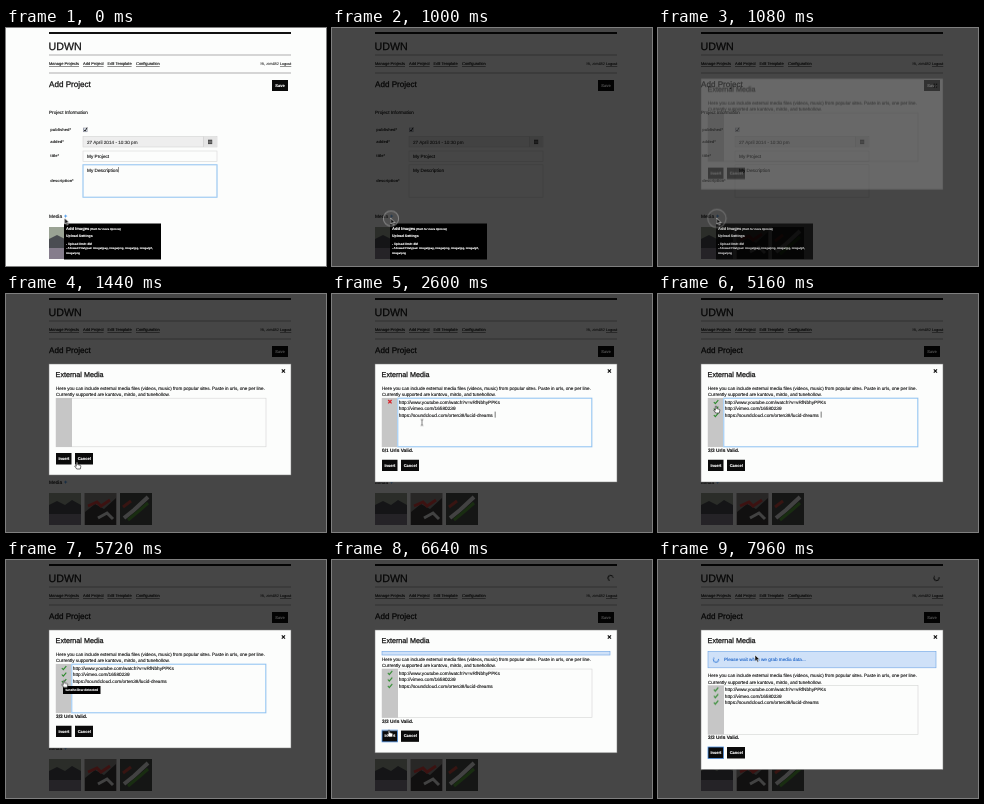
Animation, 320 px wide and 238 px high, one loop 8000 ms. Source, as an HTML page:

```html
<!DOCTYPE html>
<html lang="en">
<head>
<meta charset="utf-8">
<title>Add Project</title>
<style>
html, body { margin: 0; width: 100%; height: 100%; overflow: hidden; background: #fff; }
svg { display: block; width: 100vw; height: 100vh; }
text { font-family: "Liberation Sans", Arial, sans-serif; text-rendering: geometricPrecision; white-space: pre; }
</style>
</head>
<body>
<svg id="stage" viewBox="0 0 320 238"></svg>
<script>
const LOOP = 8000;
const PAPER = '#fcfdfc';
const stage = document.getElementById('stage');

function add(parent, tag, attrs = {}) {
  const el = document.createElementNS('http://www.w3.org/2000/svg', tag);
  for (const k in attrs) el.setAttribute(k, attrs[k]);
  return parent.appendChild(el);
}
const group = (p, x = 0, y = 0) => add(p, 'g', { transform: `translate(${x} ${y})` });
const path = (p, d, attrs) => add(p, 'path', { d, fill: 'none', ...attrs });
const rect = (p, x, y, width, height, fill, more) => add(p, 'rect', { x, y, width, height, fill, ...more });
const box = (p, x, y, w, h, fill, stroke, sw = 0.6) =>
  rect(p, x, y, w, h, fill, { stroke, 'stroke-width': sw });
// a hairline stroke gives the slightly heavier screen look
function label(p, x, y, str, size, more = {}) {
  const fill = more.fill || '#111';
  const el = add(p, 'text', { x, y, 'font-size': size, stroke: fill, 'stroke-width': 0.12, ...more, fill });
  el.textContent = str;
  return el;
}
const bold = { 'font-weight': 700 };
const white = { 'font-weight': 700, fill: '#fff' };
const link = { 'text-decoration': 'underline' };
const title = { 'stroke-width': 0.25 };

// rows: [ms, keyframe]; the last row is held to the end of the loop
function play(el, rows, easing = 'linear') {
  const frames = rows.map(([ms, f]) => ({ offset: ms / LOOP, easing, ...f }));
  frames.push({ ...frames[frames.length - 1], offset: 1 });
  el.animate(frames, { duration: LOOP, iterations: Infinity });
}
// visible from the 1st time to the 2nd, the 3rd to the 4th, ...
function show(el, ...times) {
  const rows = times.map((ms, i) => [ms, { opacity: i % 2 ? 0 : 1 }]);
  if (times[0] > 0) rows.unshift([0, { opacity: 0 }]);
  play(el, rows, 'step-end');
}
const shift = (el, rows, easing) =>
  play(el, rows.map(([ms, x, y]) => [ms, { transform: `translate(${x}px, ${y}px)` }]), easing);
function button(p, x, y, w, h, str, tx) {
  rect(p, x, y, w, h, '#0a0a0a');
  label(p, tx, y + h / 2 + 1.4, str, 4, white);
}
function focusBox(p, x, y, w, h) {
  const g = group(p);
  box(g, x, y, w, h, 'none', '#e0effb', 1.6);
  box(g, x, y, w, h, 'none', '#86bdf0', 0.7);
  return g;
}
function spinner(p, x, y, r, color, width) {
  const g = group(group(p, x, y));
  add(g, 'circle', { r, fill: 'none', stroke: color, 'stroke-width': width,
    'stroke-dasharray': `${r * 4.2} ${r * 2.1}` });
  g.animate([{ transform: 'rotate(0deg)' }, { transform: 'rotate(360deg)' }],
    { duration: 800, iterations: Infinity });
}

// page
const page = group(stage);
rect(page, 0, 0, 320, 238, PAPER);
rect(page, 43, 4, 242, 2, '#111');
label(page, 42.6, 21.8, 'UDWN', 10.7, title);
rect(page, 43, 26.6, 242, 0.8, '#999');
rect(page, 43, 44.6, 242, 0.8, '#999');
[[43, 'Manage Projects'], [77, 'Add Project'], [101.5, 'Edit Template'], [130, 'Configuration']]
  .forEach(([x, s]) => label(page, x, 37.4, s, 4, link));
label(page, 254.5, 37.4, 'Hi, zim482', 3.9, { fill: '#444' });
label(page, 274, 37.4, 'Logout', 3.7, link);
label(page, 43, 59.4, 'Add Project', 8.1, title);
button(page, 266, 52, 16, 11, 'Save', 269.3);
label(page, 43, 85.6, 'Project Information', 4.65);
[[103.3, 'published*'], [115, 'added*'], [129.3, 'title*'], [154.1, 'description*']]
  .forEach(([y, s]) => label(page, 44.3, y, s, 4.05, { ...bold, 'stroke-width': 0 }));

box(page, 77.3, 100, 3.8, 3.8, '#dfe6ee', '#778', 0.5);
path(page, 'M78 101.8l1.1 1.3 2-3.5', { stroke: '#111', 'stroke-width': 0.9 });
box(page, 77, 108.5, 134, 10.5, '#eee', '#d4d4d4');
rect(page, 197.3, 108.9, 13.4, 9.8, '#e4e4e4');
rect(page, 197, 108.5, 0.6, 10.5, '#ccc');
rect(page, 202, 111.7, 4.2, 4.4, '#444');
path(page, 'M202.4 113.3h3.4M202.4 114.7h3.4', { stroke: '#ccc', 'stroke-width': 0.4 });
label(page, 81, 115.5, '27 April 2014 - 10:30 pm', 4.65, { fill: '#333' });
box(page, 77, 123, 134, 10.5, PAPER, '#d8d8d8');
label(page, 81, 129.6, 'My Project', 4.7);
box(page, 77, 136.8, 134, 32.4, PAPER, '#d8d8d8');
const focus = focusBox(page, 77, 136.8, 134, 32.4);
rect(focus, 112.2, 139, 0.5, 5.4, '#222');
label(page, 81, 143.5, 'My Description', 4.7);
play(focus, [[0, { opacity: 1 }], [40, { opacity: 0.8 }], [280, { opacity: 0 }]]);

label(page, 43, 189.8, 'Media', 4.8);
label(page, 58, 190, '+', 5.6, { ...bold, fill: '#3a8fe8' });

// thumbnails
const thumb = (x, fill) => rect(page, x, 199, 32, 32, fill);
thumb(43, '#9aa394');
path(page, 'M43 211l8-4 8 4 7-5 9 5v9H43z', { fill: '#4a4d52' });
rect(page, 43, 220, 32, 11, '#857d8c');
thumb(78.5, '#8f8c8a');
path(page, 'M79 218l10-8 9 5 12-11v27H79z', { fill: '#3d3a3a' });
path(page, 'M82 212l9-4 4 4 9-6', { stroke: '#d8403f', 'stroke-width': 3 });
path(page, 'M92 224l9-5 6 6', { stroke: '#eee', 'stroke-width': 3 });
thumb(114, '#4d4f4d');
path(page, 'M118 224l10-8 14-13', { stroke: '#eee', 'stroke-width': 4 });
path(page, 'M122 226l12-10 8-7', { stroke: '#5aa33f', 'stroke-width': 3 });
path(page, 'M117 213l8-6', { stroke: '#c94a40', 'stroke-width': 3 });

const busy = group(page);
spinner(busy, 278.5, 18, 2.6, '#111', 1);
show(busy, 6520, LOOP);

// dimmer
show(rect(stage, 0, 0, 320, 238, '#000', { 'fill-opacity': 0.72 }), 1000, LOOP);

// upload tip
const tip = group(stage);
rect(tip, 58, 195.5, 97, 36, '#000');
label(tip, 60, 201.5, 'Add Images', 4.1, white);
label(tip, 84, 201.5, '(Hold for more Options)', 2.75, { ...white, 'font-style': 'italic' });
label(tip, 60, 209.2, 'Upload Settings', 3.5, white);
label(tip, 60, 217, '- Upload limit: 8M', 3.1, white);
label(tip, 60, 221.4, '- Allowed Filetypes: image/jpeg, image/png, image/jpg, image/gif,', 2.82, white);
label(tip, 60, 226, 'image/png', 2.82, white);
play(tip, [[0, { opacity: 1 }], [1040, { opacity: 1 }], [1200, { opacity: 0 }]]);

// dialog
const modal = group(group(stage));
const panel = box(modal, 43, 70, 242, 111, PAPER, '#777', 0.5);
const tall = h => ({ height: h + 'px' });
play(panel, [[0, tall(111)], [2599, tall(111)], [2600, tall(118)], [6560, tall(118)],
  [6920, tall(139.5)]]);
play(modal, [[0, { opacity: 0, transform: 'translateY(-24px)' }],
  [1040, { opacity: 0, transform: 'translateY(-24px)' }],
  [1380, { opacity: 1, transform: 'translateY(0px)' }]], 'ease-out');
label(modal, 49.6, 83.4, 'External Media', 7.2, title);
path(modal, 'M275.8 75.4l3.2 3.2m0-3.2l-3.2 3.2', { stroke: '#111', 'stroke-width': 1.2 });

const notice = group(modal);
const bar = box(notice, 50, 91.3, 228, 16.5, '#cfe1f8', '#6da3e4');
play(bar, [[0, tall(0)], [6560, tall(0)], [6920, tall(16.5)]]);
const wait = group(notice);
spinner(wait, 58, 99.7, 2.6, '#2f78d6', 0.9);
label(wait, 66, 101.2, 'Please wait while we grab media data...', 4.67, { fill: '#2468c8' });
play(wait, [[0, { opacity: 0 }], [6700, { opacity: 0 }], [6920, { opacity: 1 }]]);
show(notice, 6560, LOOP);

const body = group(modal);
shift(body, [[0, 0, 0], [6560, 0, 0], [6920, 0, 21.5]]);
label(body, 50, 95.8, 'Here you can include external media files (videos, music) from popular sites. Paste in urls, one per line.', 4.58);
label(body, 50, 102.4, 'Currently supported are kantovu, mirdo, and tunehollow.', 4.58);
box(body, 50, 104.2, 210, 48.6, PAPER, '#d4d4d4');
rect(body, 50, 104, 16, 49, '#c6c6c6');
show(focusBox(body, 65.8, 104.2, 194, 48.6), 1760, 6520);

const urls = group(body);
['http://www.youtube.com/watch?v=vRfNbhyPPKs', 'http://vimeo.com/16580239',
  'https://soundcloud.com/orten38/lucid-dreams']
  .forEach((s, i) => label(urls, 66.8, 109.7 + i * 6.5, s, 4.72));
show(urls, 2600, LOOP);
show(rect(body, 67, 105.3, 0.6, 5.6, '#222'), 2160, 2600);
show(rect(body, 162.8, 117.6, 0.6, 6, '#222'),
  2600, 2840, 3280, 3720, 4160, 4600, 5040, 5480, 5920, 6520);

const bad = path(body, 'M56.2 106l3.4 3.4m0-3.4l-3.4 3.4', { stroke: '#d8232a', 'stroke-width': 1.3 });
show(bad, 2600, 2680);
const good = group(body);
for (let i = 0; i < 3; i++)
  path(good, `M55.8 ${108 + i * 6.5}l1.5 1.7 3-3.5`, { stroke: '#2c8a2c', 'stroke-width': 1.1 });
show(good, 2680, LOOP);
show(label(body, 50, 157.7, '0/1 Urls Valid.', 4.8, bold), 2600, 2680);
show(label(body, 50, 157.7, '3/3 Urls Valid.', 4.8, bold), 2680, LOOP);

const foot = group(body);
shift(foot, [[0, 0, 0], [2600, 0, 6.5]], 'step-end');
button(foot, 50, 159, 15.5, 11.5, 'Insert', 52.5);
button(foot, 69, 159, 18, 11.5, 'Cancel', 71.7);
show(box(foot, 50, 159, 15.5, 11.5, 'none', '#4d8fe0', 0.8), 6520, LOOP);

// link hints
[['kantovu detected', 32, 113, 4800, 5080], ['mirdo detected', 28, 119.5, 5200, 5440],
  ['tunehollow detected', 37.5, 126, 5600, 5840]].forEach(([s, w, y, on, off]) => {
  const g = group(stage);
  rect(g, 57, y, w, 8, '#000');
  label(g, 59.4, y + 5.2, s, 3.4, white);
  show(g, on, off);
});

// press ring
const press = add(group(stage, 59, 190.5), 'circle',
  { r: 7.6, fill: '#999', 'fill-opacity': 0.15, stroke: '#999', 'stroke-width': 1 });
play(press, [[0, { opacity: 0, transform: 'scale(1.6)' }], [40, { opacity: 0, transform: 'scale(1.6)' }],
  [280, { opacity: 0.8, transform: 'scale(1)' }], [1000, { opacity: 0.8, transform: 'scale(1)' }],
  [1200, { opacity: 0, transform: 'scale(1.5)' }]]);

// pointer
const pointer = group(stage);
const outline = { stroke: '#fff', 'stroke-width': 0.5 };
const arrow = path(pointer, 'M0 0v6.2l1.5-1.3 1 2.3 1.1-.5-1-2.2h2z', { ...outline, fill: '#111' });
const hand = path(pointer, 'M-.7 .4q.7-.8 1.4 0v2.2l2.6.7q.6.3.5 1l-.5 2.7h-3.6l-2-3q.3-.8 1.6.2z',
  { fill: '#fff', stroke: '#111', 'stroke-width': 0.6 });
const beam = path(pointer, 'M-1.3-3q1.3 0 1.3.7v4.6q0 .7-1.3.7M1.3-3q-1.3 0-1.3.7M0 2.3q0 .7 1.3.7',
  { stroke: '#333', 'stroke-width': 0.6 });
show(arrow, 0, 1360, 7440, LOOP);
show(hand, 1360, 1560, 4800, 7160);
show(beam, 1560, 4800, 7160, 7440);
shift(pointer, [[0, 58.5, 190], [1120, 58.5, 190], [1400, 71, 168], [1480, 71, 168], [1800, 92, 127.5],
  [1880, 91, 127.5], [2160, 91, 127.5], [2320, 90, 128.5], [3680, 90, 128.5], [3800, 91, 130.5],
  [4080, 91, 130.5], [4300, 99, 118], [4520, 98.5, 108], [4840, 58, 108], [5080, 58, 109],
  [5240, 58, 115], [5440, 58, 116], [5640, 58, 120.5], [5760, 58, 120.5], [6240, 57, 170],
  [6920, 57, 170], [7320, 74, 138], [7800, 96, 98], [7960, 97, 95]]);
</script>
</body>
</html>
```
